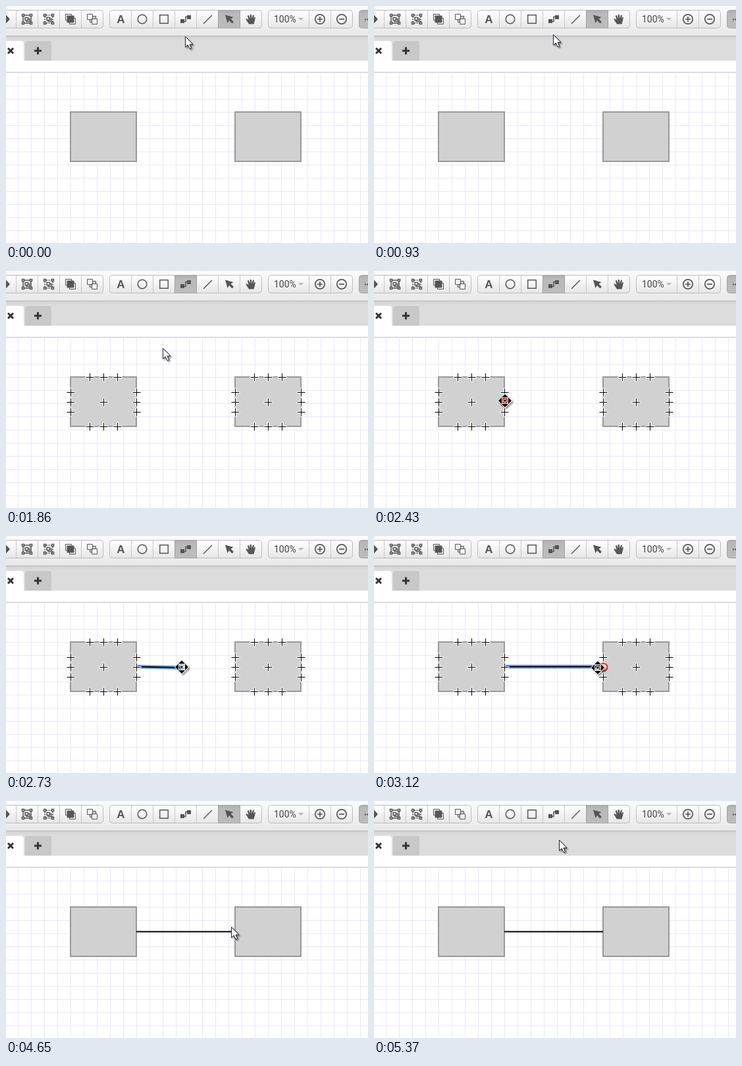
Recreate the animation shown at these times as an HTML page. Size 550 by 360 pixels, loop 6.3 s.

```html
<!DOCTYPE html>
<html lang="en">
<head>
<meta charset="utf-8">
<title>Connecting two shapes</title>
<style>
html, body { margin: 0; width: 100%; height: 100%; overflow: hidden; background: #fff; }
svg { display: block; }
text { font-family: "Liberation Sans", Arial, sans-serif; }
.group { fill: url(#button); stroke: #bcbcbc; }
.seam { stroke: #c6c6c6; fill: none; }
.pressed { fill: url(#down); stroke: #a2a2a2; }
.line { fill: none; stroke: #555; stroke-width: 1.5; }
.solid { fill: #555; }
.box { fill: #d1d1d1; stroke: #999; stroke-width: 2; }
</style>
</head>
<body>
<svg width="550" height="360" viewBox="0 0 550 360">
  <defs>
    <linearGradient id="bar" x2="0" y2="1"><stop stop-color="#fbfbfb"/><stop offset="1" stop-color="#e8e8e8"/></linearGradient>
    <linearGradient id="button" x2="0" y2="1"><stop stop-color="#fff"/><stop offset="1" stop-color="#e6e6e6"/></linearGradient>
    <linearGradient id="down" x2="0" y2="1"><stop stop-color="#adadad"/><stop offset=".2" stop-color="#b9b9b9"/><stop offset="1" stop-color="#bcbcbc"/></linearGradient>
    <linearGradient id="strip" x2="0" y2="1"><stop stop-color="#d2d2d2"/><stop offset=".15" stop-color="#dcdcdc"/><stop offset="1" stop-color="#dcdcdc"/></linearGradient>
    <pattern id="grid" x="18" y="101" width="20" height="20" patternUnits="userSpaceOnUse">
      <path d="M.5 0V20M0 .5H20" stroke="#e9e8fb"/>
    </pattern>
    <filter id="shadow" x="-50%" y="-50%" width="200%" height="200%">
      <feDropShadow dx="2" dy="2" stdDeviation="1" flood-opacity=".45"/>
    </filter>
    <g id="corners" class="line" stroke-width="1.2">
      <path d="M-7.5-7.5h3v3h-3zM4.5-7.5h3v3h-3zM-7.5 4.5h3v3h-3zM4.5 4.5h3v3h-3z"/>
      <path d="M-3-2.5H1.5V1.5H-3zM1.5-.5H4V3.5H-1V1.5"/>
    </g>
    <g id="cross">
      <path d="M-7 0H7M0-7V7" stroke="#fff" stroke-width="3"/>
      <path d="M-6 0H6M0-6V6" stroke="#000"/>
    </g>
  </defs>

  <!-- Page and tabs -->
  <rect y="101" width="550" height="259" fill="url(#grid)"/>
  <path d="M0 100.5H550" stroke="#cfcfcf"/>
  <rect y="46" width="550" height="37" fill="url(#strip)"/>
  <path d="M0 53H23q4 0 4 4V83H0z" fill="#fff"/>
  <path d="M29 83V57q0-4 4-4H65q4 0 4 4V83z" fill="#c8c8c8"/>
  <path d="M3 64l8 8M11 64l-8 8" stroke="#333" stroke-width="3"/>
  <path d="M43 68H54M48.5 62.5V73.5" stroke="#333" stroke-width="3"/>

  <!-- Toolbar -->
  <rect width="550" height="45" fill="url(#bar)"/>
  <path d="M0 45.5H550" stroke="#b4b4b4"/>
  <rect class="group" x="-20" y="6.5" width="167.5" height="27" rx="4"/>
  <rect class="group" x="157.5" y="6.5" width="231" height="27" rx="4"/>
  <rect class="group" x="398.5" y="6.5" width="128" height="27" rx="4"/>
  <rect class="pressed" x="536.5" y="6.5" width="40" height="27" rx="4"/>
  <path class="seam" d="M15.5 7V33M48.5 7V33M81.5 7V33M114.5 7V33M190.5 7V33M223.5 7V33M256.5 7V33M289.5 7V33M322.5 7V33M355.5 7V33M460.5 7V33M493.5 7V33"/>
  <rect id="active" class="pressed" y="6.5" width="33" height="27"/>

  <path class="solid" d="M0 13.5L6 20L0 26.5z"/>
  <g transform="translate(32 20)"><use href="#corners"/><path class="line" d="M-4-6H4M-4 6H4M-6-4V4M6-4V4"/></g>
  <g transform="translate(65 20)"><use href="#corners"/><path class="line" stroke-dasharray="2 1.5" d="M-4-6H4M-4 6H4M-6-4V4M6-4V4"/></g>
  <g class="line" style="stroke-width:1">
    <path d="M90.5 12.5h9v9h-9zM96.5 18.5h9v9h-9z" fill="#f4f4f4"/>
    <path d="M93 15h10v10h-10z" class="solid"/>
    <path d="M127.5 15.5h9v9h-9z" fill="#ccc"/>
    <path d="M123.5 12.5h8v8h-8zM130.5 19.5h8v8h-8z" fill="#f6f6f6"/>
  </g>
  <text class="solid" x="174.5" y="26" font-size="17" font-weight="700" text-anchor="middle">A</text>
  <circle class="line" cx="207" cy="20" r="6.8"/>
  <rect class="line" x="233.7" y="13.7" width="12.6" height="12.6"/>
  <path class="solid" d="M265 20h6v6h-6zM275 14h6v6h-6z"/>
  <path class="line" d="M271 23.5H273V16.5H276"/>
  <path class="line" d="M300 27L313 14"/>
  <path class="solid" d="M333 13.5L345.5 17L341.5 19.5L346 24L343.5 26.5L339 22L336.5 26z"/>
  <path class="solid" d="M369 27.5L364.5 20.5Q364.5 18.5 366.5 19.5L368.5 21.5L367 15Q368 13 369.3 15L370.5 19L370.8 13.5Q372 12 373 13.5L373.2 19L375 14Q376.5 13 377 14.5L376 20L377.5 17Q379 16.5 379 18L376.5 27.5z"/>
  <text x="407" y="25" font-size="14" fill="#444" style="font-family:Roboto,sans-serif">100%</text>
  <path d="M444 18H452L448 22z" fill="#b5b5b5"/>
  <g class="line" style="stroke-width:1.7">
    <circle cx="477" cy="20" r="7.2"/><path d="M473 20H481M477 16V24"/>
    <circle cx="510" cy="20" r="7.2"/><path d="M506 20H514"/>
  </g>
  <path d="M545 20.5H550" stroke="#555" stroke-width="2" stroke-dasharray="2 1"/>

  <!-- Drawing -->
  <rect class="box" x="98" y="161" width="100" height="75"/>
  <rect class="box" x="348" y="161" width="100" height="75"/>
  <path id="glow" stroke="#78a5da" stroke-width="6"/>
  <path id="wire" stroke="#000" stroke-width="2"/>
  <g id="anchors"></g>
  <circle id="snap" cy="199.5" r="6" stroke="#df3329" stroke-width="2.2"/>

  <g id="tip">
    <path d="M268 43L273 38L278 43z"/>
    <rect x="209" y="43" width="128" height="22" rx="4"/>
    <text x="273" y="57.5" font-size="11" fill="#fff" text-anchor="middle">Connector Tool (Ctrl+3)</text>
  </g>

  <g id="arrow" filter="url(#shadow)">
    <path d="M.5 .5V16.5L4.3 13L7 19.2L9.6 18L7 12.2H12z" fill="#fff" stroke="#1c1c30"/>
  </g>
  <g id="move" filter="url(#shadow)">
    <path d="M-10 0L-5-5V5zM10 0L5-5V5zM0-10L-5-5H5zM0 10L-5 5H5zM-1.5-1.5h3v3h-3z" stroke="#fff" stroke-width="1.6" paint-order="stroke"/>
  </g>
</svg>
<script>
const LOOP = 6300, STEP = 30;
const el = id => document.getElementById(id);
const show = (id, on) => el(id).style.display = on ? "" : "none";
const clamp = v => Math.min(1, Math.max(0, v));
const ramp = (t, from, to) => clamp((t - from) / (to - from));

// [time, x, y] stops for the pointer
const pointerPath = [
  [0, 272, 46], [900, 272, 46], [930, 272, 43], [1110, 272, 24],
  [1560, 272, 24], [1680, 272, 39], [1770, 262, 68], [1920, 222, 150], [2040, 201, 188], [2100, 198, 194],
  [2400, 198, 194], [2430, 199, 197], [2520, 209, 198], [2700, 258, 199], [2910, 320, 200], [3060, 337, 200],
  [3120, 340, 200], [3270, 350, 201], [4020, 350, 200], [4050, 343, 194],
  [4620, 343, 194], [4650, 342, 191], [4770, 333, 173], [4950, 308, 128], [5130, 287, 92], [5280, 281, 74],
  [5370, 281, 59], [LOOP, 281, 59]
];

function pointerAt(t) {
  const i = pointerPath.findIndex(stop => stop[0] > t);
  const [t0, x0, y0] = pointerPath[i - 1], [t1, x1, y1] = pointerPath[i];
  const k = ramp(t, t0, t1);
  return [Math.round(x0 + (x1 - x0) * k), Math.round(y0 + (y1 - y0) * k)];
}

function addAnchors(left) {
  const points = [[50, 38]];
  for (const x of [29, 50, 71]) points.push([x, 0], [x, 75]);
  for (const y of [23, 38, 53]) points.push([0, y], [100, y]);
  el("anchors").innerHTML += points.map(([x, y]) =>
    `<use href="#cross" x="${left + x + .5}" y="${161 + y + .5}"/>`).join("");
}
addAnchors(98);
addAnchors(348);

function draw(t) {
  const connecting = t >= 1500 && t < 4050;
  const dragging = t >= 2430 && t < 4050;
  const snapped = t >= 3090;
  const [x, y] = pointerAt(t);

  el("active").setAttribute("x", connecting ? 256.5 : 322.5);
  show("anchors", connecting);

  show("arrow", !dragging);
  show("move", dragging);
  el(dragging ? "move" : "arrow").setAttribute("transform", `translate(${x} ${y})`);

  const line = snapped ? "M198 198.5H348" : `M198 198.5L${x} ${y + 1}`;
  el("wire").setAttribute("d", line);
  el("glow").setAttribute("d", line);
  show("wire", t > 2430);
  show("glow", t > 2430 && dragging);

  show("snap", t >= 2070 && t <= 2430 || snapped && dragging);
  el("snap").setAttribute("cx", snapped ? 348.5 : 198.5);
  el("snap").setAttribute("fill", snapped ? "#f8dedb" : "#e8574d");

  el("tip").setAttribute("opacity", .8 * ramp(t, 1290, 1410) * (1 - ramp(t, 1560, 1695)));
}

function frame() {
  const t = performance.now() % LOOP;
  draw(Math.floor(t / STEP) * STEP);
  requestAnimationFrame(frame);
}
frame();
</script>
</body>
</html>
```
